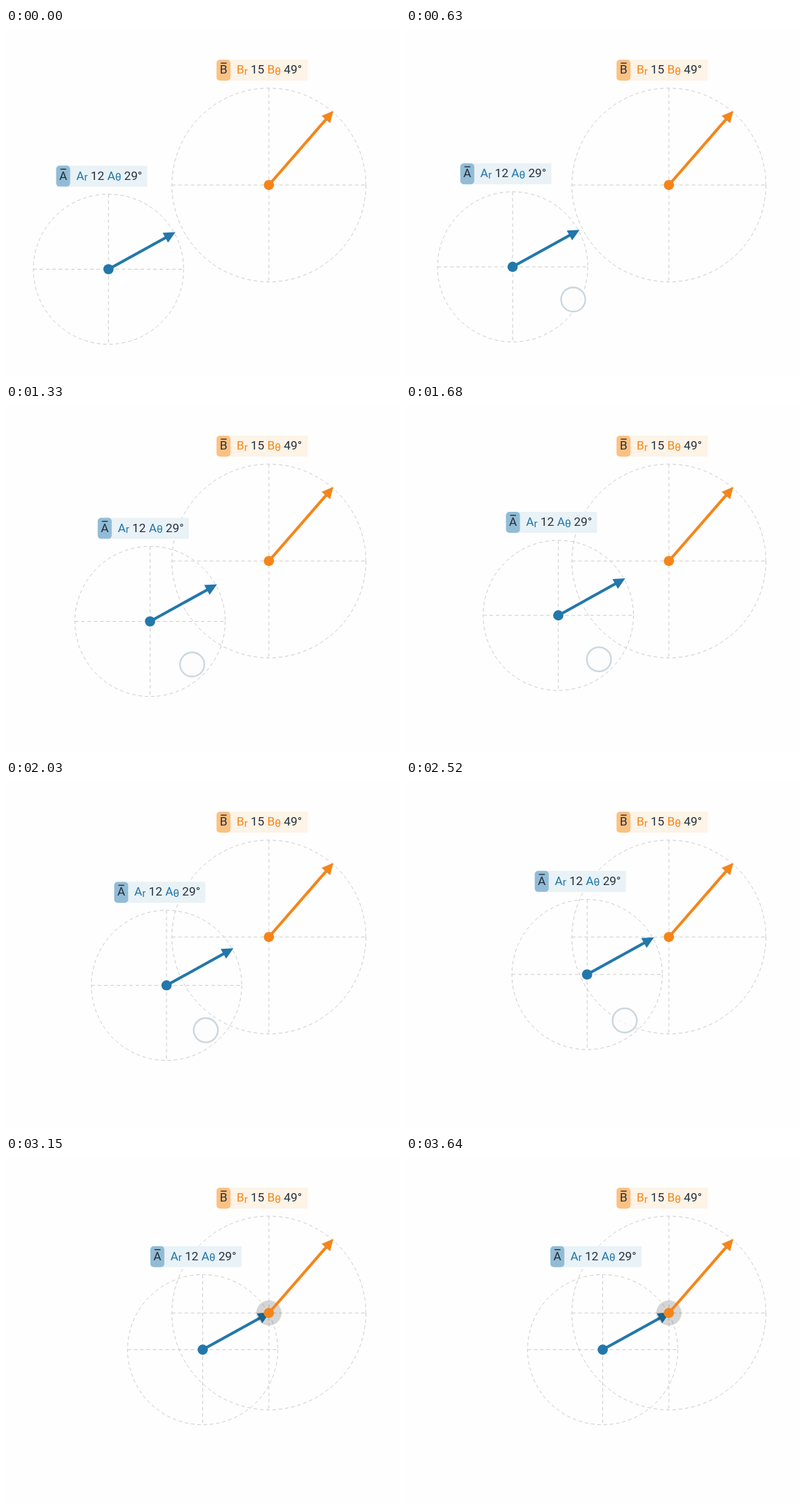
An HTML page that plays this animation: 562 px wide and 497 px high, repeating every 3.78 s.

```html
<!DOCTYPE html>
<html lang="en">
<head>
<meta charset="utf-8">
<title>Dragging vector A to snap onto vector B</title>
<style>
  html, body { margin: 0; width: 100%; height: 100%; overflow: hidden; background: #fefefe; }
  svg { display: block; width: 562px; height: 497px; }
  text { font: 17.2px Roboto, sans-serif; fill: #25303b; }
  .sub { font-size: .88em; }
  .guide { fill: none; stroke: #cbcbcf; stroke-width: 1; stroke-dasharray: 5 4; }
  .bar { stroke: #25303b; stroke-width: 1.4; }
</style>
</head>
<body>
<svg id="stage" viewBox="0 0 562 497"></svg>
<script>
const LOOP = 3780, STEP = 70, SNAP = 2870;

const A = { name: 'A', mag: 12, deg: 29, r: 107.2, color: '#2277ab', tint: '#e9f2f6', badge: '#92bcd6' };
const B = { name: 'B', mag: 15, deg: 49, r: 138.3, color: '#f58518', tint: '#fdf3e6', badge: '#fbc183' };

// The hand drags in three strokes between these rests
const rests = [
  { t: 450, vec: [146.2, 344.5], hand: [235.5, 389.5] },
  { t: 1330, vec: [205.5, 310.5], hand: [265.5, 372] },
  { t: 2030, vec: [229, 293.3], hand: [285, 357.3] },
  { t: 2660, vec: [262.2, 275.7], hand: [315.5, 341.6] }
];
const target = [375, 224.2];
const docked = [280.6, 276.6];

const move = ([x, y]) => `translate(${x} ${y})`;

const guides = v => `<g class="guide"><circle r="${v.r}"/>
  <path d="M${-v.r} 0H${v.r}M0 ${-v.r}V${v.r}"/></g>`;

const arrow = v => {
  const tip = v.r + 2;
  return `<g fill="${v.color}"><circle r="7.3"/><g transform="rotate(${-v.deg})">
    <path d="M0 0H${tip - 12}" stroke="${v.color}" stroke-width="4"/>
    <path d="M${tip} 0l-16.5 -8v16z"/></g></g>`;
};

const symbol = (v, sub) =>
  `<tspan fill="${v.color}">${v.name}<tspan class="sub" dy="1.5">${sub}</tspan></tspan><tspan dy="-1.5"> </tspan>`;

const label = v => `<g transform="${move([-74.7, -v.r - 40.7])}">
  <rect x="10" width="120" height="30" fill="${v.tint}"/>
  <rect width="20" height="30" rx="5" fill="${v.badge}"/>
  <text x="10" y="20" text-anchor="middle">${v.name}</text>
  <path class="bar" d="M6 5h8.4"/>
  <text x="28.7" y="20">${symbol(v, 'r')}${v.mag} ${symbol(v, 'θ')}${v.deg}°</text></g>`;

const onTarget = body => `<g transform="${move(target)}">${body}</g>`;

document.getElementById('stage').innerHTML =
  onTarget(guides(B)) +
  `<g id="a">${guides(A)}${label(A)}${arrow(A)}</g>` +
  onTarget(`<circle id="halo" r="18" fill-opacity=".16"/>${arrow(B)}${label(B)}`) +
  `<circle id="pointer" r="17.3" fill="#fefefe" fill-opacity=".7" stroke="#ccd7df" stroke-width="2.4"/>`;

const [vecA, halo, pointer] = ['a', 'halo', 'pointer'].map(id => document.getElementById(id));

const clamp = n => Math.min(1, Math.max(0, n));
const ease = u => (1 - Math.cos(Math.PI * clamp(u))) / 2;

// Sum of the eased strokes made so far
function drag(t, key) {
  return rests.slice(1).reduce((pos, to, i) => {
    const from = rests[i], e = ease((t - from.t) / (to.t - from.t));
    return pos.map((p, k) => p + e * (to[key][k] - from[key][k]));
  }, rests[0][key]);
}

function draw(now) {
  const t = Math.floor(now % LOOP / STEP) * STEP;
  const snapped = t >= SNAP;
  vecA.setAttribute('transform', move(snapped ? docked : drag(t, 'vec')));
  pointer.setAttribute('transform', move(drag(t, 'hand')));
  pointer.setAttribute('opacity', clamp((t - 280) / 210) * clamp((3150 - t) / 210));
  halo.setAttribute('opacity', snapped ? 1 : 0);
}

let start;
function tick(now) {
  start ??= now;
  draw(now - start);
  requestAnimationFrame(tick);
}
draw(0);
requestAnimationFrame(tick);
</script>
</body>
</html>
```
